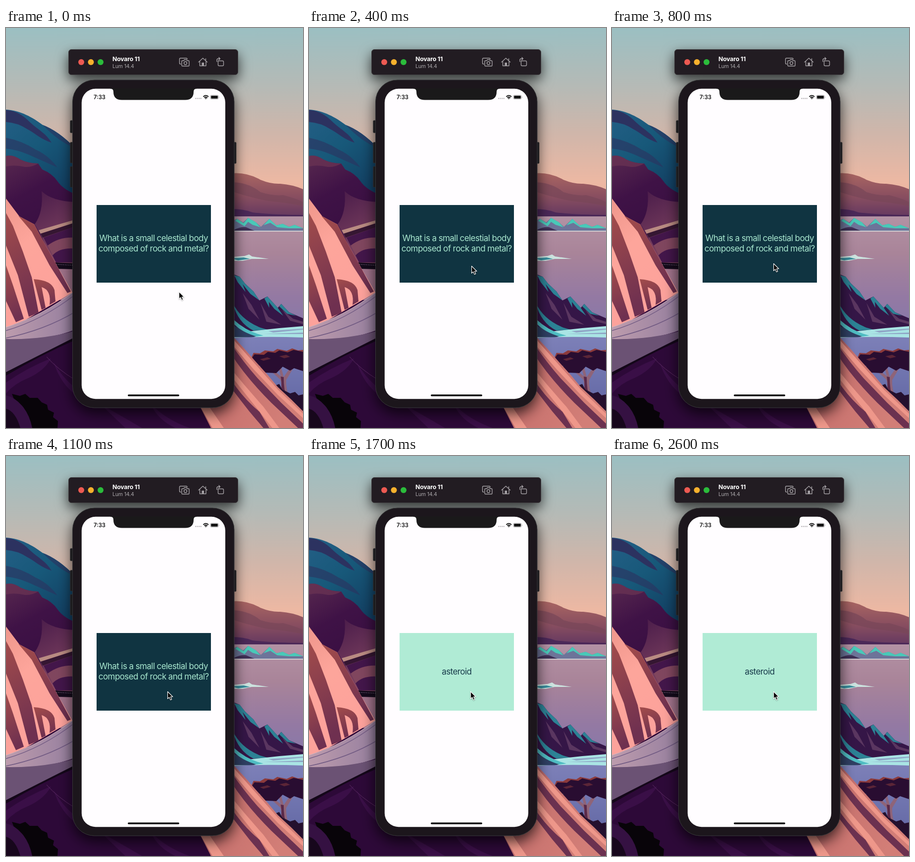
Animation, 600 px wide and 809 px high, one loop 2.7 s. Source, as an HTML page:

```html
<!DOCTYPE html>
<html lang="en">
<head>
<meta charset="utf-8">
<title>Flash card</title>
<style>
  html, body { margin: 0; width: 100%; height: 100%; overflow: hidden; }
  body { position: relative; font-family: Inter, sans-serif; }
  svg { position: absolute; left: 0; top: 0; display: block; }
  .face {
    position: absolute; left: 183px; top: 358px; width: 230.5px; height: 156.5px;
    display: flex; align-items: center; justify-content: center;
    font-size: 17px; line-height: 21px; letter-spacing: -.58px;
    text-align: center; white-space: nowrap;
  }
  #front { background: #103441; color: #a9e8d0; }
  #back { background: #b0ebd5; color: #17394a; }
</style>
</head>
<body>
<svg width="600" height="809" viewBox="0 0 600 809">
  <defs>
    <linearGradient id="sky" x2="0" y2="1">
      <stop offset="0" stop-color="#9bbfc2"/><stop offset=".3" stop-color="#b5bab6"/>
      <stop offset=".55" stop-color="#d0b6aa"/><stop offset=".8" stop-color="#edb8a3"/>
      <stop offset="1" stop-color="#e8ab98"/>
    </linearGradient>
    <linearGradient id="blue" x2=".7" y2="1">
      <stop offset="0" stop-color="#245f86"/><stop offset=".5" stop-color="#175879"/>
      <stop offset="1" stop-color="#123f62"/>
    </linearGradient>
    <linearGradient id="plum" x2=".2" y2="1">
      <stop offset="0" stop-color="#59294f"/><stop offset=".25" stop-color="#3f1246"/>
      <stop offset="1" stop-color="#2c0839"/>
    </linearGradient>
    <linearGradient id="mauve" x2=".3" y2="1">
      <stop offset="0" stop-color="#4a1c4a"/><stop offset="1" stop-color="#824662"/>
    </linearGradient>
    <linearGradient id="pink" x2=".4" y2="1">
      <stop offset="0" stop-color="#ee968b"/><stop offset=".4" stop-color="#fda59b"/>
      <stop offset="1" stop-color="#fca19b"/>
    </linearGradient>
    <linearGradient id="rust" x2=".2" y2="1">
      <stop offset="0" stop-color="#a24c4b"/><stop offset="1" stop-color="#6f3050"/>
    </linearGradient>
    <linearGradient id="hill" x2="0" y2="1">
      <stop offset="0" stop-color="#a96562"/><stop offset=".55" stop-color="#884e60"/>
      <stop offset="1" stop-color="#643860"/>
    </linearGradient>
    <linearGradient id="sea" x2="0" y2="1">
      <stop offset="0" stop-color="#b392a4"/><stop offset=".3" stop-color="#a98499"/>
      <stop offset=".65" stop-color="#9479a3"/><stop offset="1" stop-color="#8278ac"/>
    </linearGradient>
    <linearGradient id="bay" x2="0" y2="1">
      <stop offset="0" stop-color="#7d80b8"/><stop offset="1" stop-color="#5c62a0"/>
    </linearGradient>
    <linearGradient id="road" x2="1">
      <stop offset="0" stop-color="#bd9cad"/><stop offset="1" stop-color="#957e9e"/>
    </linearGradient>
    <linearGradient id="cliff" x2="1" y2=".4">
      <stop offset="0" stop-color="#8d4758"/><stop offset=".5" stop-color="#c9736f"/>
      <stop offset="1" stop-color="#d27e77"/>
    </linearGradient>
    <filter id="shade" x="-30%" y="-30%" width="160%" height="160%">
      <feDropShadow dx="0" dy="11" stdDeviation="14" flood-color="#000" flood-opacity=".72"/>
    </filter>
    <filter id="glow" x="-30%" y="-100%" width="160%" height="320%">
      <feDropShadow dx="0" dy="10" stdDeviation="13" flood-color="#000" flood-opacity=".72"/>
    </filter>
  </defs>

  <path fill="url(#sky)" d="M0 0H600V390H0z"/>

  <!-- far left mountain -->
  <path fill="url(#blue)" d="M0 165C30 167 54 181 74 196Q106 208 140 243V345H0z"/>
  <g fill="#2c3260">
    <path d="M0 166C22 167 36 178 50 192C64 205 82 214 92 232C70 225 58 212 42 204Q24 192 0 190z"/>
    <path d="M74 196Q106 208 138 242Q108 231 74 196z" opacity=".6"/>
    <path d="M0 222Q32 228 60 246Q84 256 104 282Q72 268 50 258Q24 246 0 244z" opacity=".6"/>
  </g>

  <!-- plum ridge -->
  <path fill="url(#plum)" d="M0 259Q13 255 29 266Q46 274 65 274L73 286Q93 294 104 310Q115 326 140 336V640H0z"/>
  <path fill="#6c3453" d="M0 259Q13 255 29 266Q46 274 65 274Q52 282 38 281Q18 276 0 280z" opacity=".7"/>
  <path fill="url(#mauve)" d="M72 330Q92 350 140 352V480H98L70 418L58 397Q76 372 72 330z"/>
  <path fill="#43164a" d="M76 424L138 402V474H101z"/>
  <path fill="#80465e" d="M84 440Q108 422 138 424V446Q108 444 94 460z"/>
  <path fill="#b98b82" d="M66 409L138 388V394L70 416z"/>
  <path fill="#351632" d="M70 416L138 394V402L74 424z"/>

  <!-- viaduct and near left cliff -->
  <path fill="#a2748c" d="M96 484H140V550H96z"/>
  <path fill="#140a1b" d="M96 474L140 476V488L103 487z"/>
  <path stroke="#9a8aa0" stroke-dasharray="1.5 2" d="M98 478L140 480"/>
  <path fill="url(#pink)" d="M0 345L27 381L57 397L72 425L102 479L134 535L40 590L0 606z"/>
  <g fill="url(#rust)">
    <path d="M25 380L57 397L72 425L102 479L131 533L124 536L88 480L52 412z"/>
    <path d="M0 374L14 400L34 452L52 504L66 576L46 584L24 500L0 440z"/>
    <path d="M0 480L14 520L36 588L20 595L0 552z"/>
    <path d="M56 508Q92 510 98 530L100 553L88 560Q92 530 72 524L80 566L72 570z"/>
  </g>
  <path fill="url(#road)" d="M0 605Q70 584 140 531V610Q84 632 0 632z"/>
  <path fill="#6b5274" d="M0 629Q75 631 140 612V640Q90 656 0 697z"/>
  <path fill="none" stroke="#715a83" stroke-width="1.500" d="M0 612Q73 591 140 539M0 627Q78 611 140 574"/>
  <path fill="none" stroke="#d9b7bd" d="M0 605Q70 584 140 531"/>

  <!-- foreground -->
  <path fill="#2d0938" d="M0 697Q75 659 140 625L470 690V809H0z"/>
  <path fill="#140719" d="M0 696Q76 657 140 625V631Q71 661 0 703z"/>
  <path fill="#3a0f47" d="M0 717Q43 687 91 668Q78 693 45 708Q17 719 0 739zM96 675Q113 707 145 732V745Q110 721 96 675zM190 760L275 809H241zM292 760Q323 792 371 809H342Q306 792 292 760z"/>
  <path fill="none" stroke="#5c2c62" d="M82 665Q104 690 140 712"/>
  <path fill="#080409" d="M13 809Q10 780 17 753L12 740L28 744L39 740L48 748L64 748L72 757L83 762L85 772L97 778L95 787L105 795L104 809z"/>
  <path fill="#351142" d="M0 743Q19 747 35 767Q48 784 53 809H0z"/>
  <path fill="#17071c" d="M0 770Q19 775 29 809H0z"/>

  <!-- right coast -->
  <path fill="url(#hill)" d="M455 294Q486 291 514 307Q536 316 554 315Q580 317 600 326V382H455z"/>
  <path fill="#784657" opacity=".7" d="M455 312Q490 312 514 332Q540 340 560 338Q584 344 600 352V360Q560 352 530 350Q490 342 455 330z"/>
  <path fill="#4b2858" d="M455 366Q481 366 498 373Q540 378 600 378V382H455z"/>
  <path fill="url(#sea)" d="M455 381H600V630H455z"/>
  <path fill="#6d7499" d="M455 390L467 386L479 393L489 384L505 393L515 402L532 386L546 399L559 396L572 402L583 398L600 405V410H455z"/>
  <path fill="#49c9b8" d="M463 390L467 386L480 395L489 384L505 393L514 403L498 398L489 392L482 401zM520 399L532 386L546 399L559 396L572 402L583 398L600 405L572 405L548 403L534 394z"/>
  <path fill="#403056" d="M461 408Q473 402 485 403L502 410H461z"/>
  <path fill="#dfe3e2" d="M455 410H600V411.500H455z"/>
  <path fill="#cce3df" d="M455 463L482 461L491 458L497 462L531 467L496 467L478 471L455 471z"/>
  <path fill="#388d9d" d="M455 466L480 464L493 467L469 470z"/>

  <path fill="#351647" d="M455 496L472 503L483 517L500 533L512 551L528 543L549 566L556 558L572 575L600 587V608L505 614L455 626z"/>
  <path fill="#2c8295" d="M461 500L472 503L483 517L500 533L512 551L494 538L478 518L484 534L468 514zM522 547L528 543L549 566L560 582L542 568L531 554L532 566zM552 563L556 558L572 575L586 582L568 578zM458 556Q474 590 514 606L528 610L500 612Q468 596 458 556z"/>
  <path fill="#5a3660" d="M478 536L496 560L512 590L490 568zM514 556L530 584L556 600L526 594zM558 570L580 588L600 594V599L574 592z"/>
  <path fill="#a9e4e4" d="M455 618L515 611L552 607L600 603V626L455 627z"/>
  <path fill="#2f3f63" d="M455 600Q480 612 512 622L496 626L455 625z"/>
  <path fill="#4fbcc2" d="M460 590Q486 614 520 622L506 624Q474 614 460 598z"/>
  <path fill="#8fa5c6" d="M530 613L600 608V610L540 616zM520 619L600 616V619z"/>
  <path fill="url(#bay)" d="M455 627Q517 623 600 626V809H455z"/>

  <!-- tree -->
  <path fill="#8f6478" d="M555 683L561 706L574 687L579 690L566 712Q565 729 573 750H553Q559 724 554 711L534 693L540 692L555 704L550 684z"/>
  <path fill="#5a2949" d="M555 705L561 706Q561 730 567 751H553Q559 725 555 705z"/>
  <path fill="#8c3a3b" d="M494 671L500 657L513 658L523 652L540 654L548 649L567 653L578 648L590 652L600 651V670H500z"/>
  <path fill="#290d31" d="M490 677L502 660L521 661L529 655L544 657L552 652L569 656L581 651L600 655V694L582 688L574 693L559 685L546 698L524 697L505 690L514 684L498 678z"/>
  <path fill="#5b2537" d="M513 670L528 666L535 669L520 673zM552 664L566 661L574 665L562 668z"/>
  <path fill="#24102e" d="M536 741L541 724L552 720L558 731L574 739L584 736L591 743L600 741V794H585z"/>
  <path fill="#454c85" d="M538 738L543 728L552 728L550 738L566 748L581 757L590 768L564 754z"/>

  <!-- near right cliff -->
  <path fill="url(#cliff)" d="M390 762L455 620L481 648L502 672L529 702L549 726L577 752L600 775V809H414z"/>
  <path fill="#6b3150" d="M455 640Q480 676 508 708L556 758L600 800V809H590L536 758Q486 708 455 660zM455 712Q480 750 512 776L532 809H520L492 776Q470 748 455 728z"/>
  <path fill="#ee978a" d="M461 632L502 678L549 731L600 780V789L549 742L500 690L461 645zM455 690Q486 728 520 766L552 809H538L506 768Q474 728 455 704zM393 767L412 768L440 809H417z"/>

  <!-- simulator bar -->
  <rect x="126.500" y="43.500" width="342" height="51" rx="5.500" fill="#231f23" stroke="#403d40" filter="url(#glow)"/>
  <circle cx="152" cy="69" r="6" fill="#ed5a52"/>
  <circle cx="171.500" cy="69" r="6" fill="#f7b12d"/>
  <circle cx="191" cy="69" r="6" fill="#2bbd3b"/>
  <text x="215" y="67" font-size="12.300" font-weight="700" letter-spacing="-.2" fill="#fff">Novaro 11</text>
  <text x="215" y="80.500" font-size="10.600" letter-spacing="-.2" fill="#aaa7aa">Lum 14.4</text>
  <g fill="none" stroke="#a4a0a4" stroke-width="1.400" stroke-linejoin="round" stroke-linecap="round">
    <path d="M353 73Q350.500 73 350.500 70.500V63Q350.500 61 352.500 61H364Q366 61 366 63"/>
    <path d="M357 66H359L360.500 64H364.500L366 66H368.500Q370 66 370 67.500V75.500Q370 77 368.500 77H356.500Q355 77 355 75.500V67.500Q355 66 357 66z"/>
    <circle cx="362.500" cy="71" r="3"/>
    <path d="M389 69L397.700 61L406.500 69M391.500 68V76.500H404V68M403.500 65V62"/>
    <path d="M428.500 66.500H437.500Q439.500 66.500 439.500 68.500V74.500Q439.500 76.500 437.500 76.500H430.500Q428.500 76.500 428.500 74.500zM426 68V65Q426 62 429 62H432M430 59.500L432.500 62L430 64.500"/>
  </g>
  <path fill="#a4a0a4" d="M395.500 70H400V77H395.500z"/>

  <!-- phone -->
  <g fill="#29282b" stroke="#444246" stroke-width=".7">
    <rect x="129.700" y="187" width="7" height="25" rx="1.500"/>
    <rect x="129.700" y="231" width="7" height="42" rx="1.500"/>
    <rect x="129.700" y="280" width="7" height="42" rx="1.500"/>
    <rect x="458" y="231" width="7" height="43" rx="1.500"/>
  </g>
  <rect x="134.500" y="105" width="326.500" height="663" rx="44" fill="#1a191a" stroke="#363538" filter="url(#shade)"/>
  <rect x="152.800" y="122.800" width="290.200" height="627.400" rx="28" fill="#fffdff"/>
  <path fill="#1a191a" d="M211 122H385V122.800Q379 122.800 379 129Q379 145.600 362 145.600H234Q217 145.600 217 129Q217 122.800 211 122.800z"/>
  <text x="177" y="144" font-size="11.200" font-weight="600" fill="#111">7:33</text>
  <path stroke="#b7b5b7" stroke-width="2" stroke-dasharray="2.400 1.100" d="M382 142.500H395"/>
  <path fill="none" stroke="#111" stroke-width="2" d="M398.500 139Q403.700 134 409 139M400.700 141.200Q403.700 138.500 406.800 141.200"/>
  <path fill="#111" d="M402 142.300Q403.700 141 405.500 142.300L403.700 144.300z"/>
  <rect x="413" y="135.900" width="16" height="8" rx="2.200" fill="none" stroke="#8c8a8c" stroke-width=".8"/>
  <rect x="414.200" y="137.100" width="13.600" height="5.600" rx="1.200" fill="#111"/>
  <path fill="#8c8a8c" d="M430 138.500Q431.500 140 430 141.500z"/>
  <rect x="246" y="741.200" width="104" height="3.600" rx="1.800" fill="#080808"/>
</svg>

<div class="face" id="front">What is a small celestial body<br>composed of rock and metal?</div>
<div class="face" id="back">asteroid</div>

<svg id="cursor" width="20" height="24" viewBox="-2 -2 20 24">
  <path d="M.5.5V15L3.800 12L6.200 17.400L8.800 16.300L6.500 11H11z" fill="#080808" stroke="#fff" stroke-width="1.100" stroke-linejoin="round"
    style="filter: drop-shadow(0 1px 1px rgba(0,0,0,.35))"/>
</svg>

<script>
  const LOOP = 2700, STEP = 100;
  const FLIP = { start: 1170, length: 420 };
  // Pointer stops: time, x, y
  const path = [[0, 349, 533], [100, 346, 525], [200, 340, 511], [300, 333, 494],
                [400, 328, 481], [500, 326, 476]];
  const [front, back, cursor] = ['front', 'back', 'cursor'].map(id => document.getElementById(id));

  function pointer(t) {
    const i = path.findIndex(p => p[0] > t);
    if (i < 0) return path[path.length - 1].slice(1);
    const a = path[i - 1], b = path[i], k = (t - a[0]) / (b[0] - a[0]);
    return [1, 2].map(n => a[n] + (b[n] - a[n]) * k);
  }

  function turn(face, angle, visible) {
    face.style.visibility = visible ? 'visible' : 'hidden';
    face.style.transform = angle ? `perspective(231px) rotateY(${angle}deg)` : 'none';
  }

  function draw(now) {
    const t = Math.floor(now % LOOP / STEP) * STEP;
    const angle = 180 * Math.min(1, Math.max(0, (t - FLIP.start) / FLIP.length));
    turn(front, angle, angle < 90);
    turn(back, angle - 180, angle >= 90);
    const [x, y] = pointer(t);
    cursor.style.transform = `translate(${x - 2}px, ${y - 2}px)`;
    requestAnimationFrame(draw);
  }
  draw(performance.now());
</script>
</body>
</html>
```
